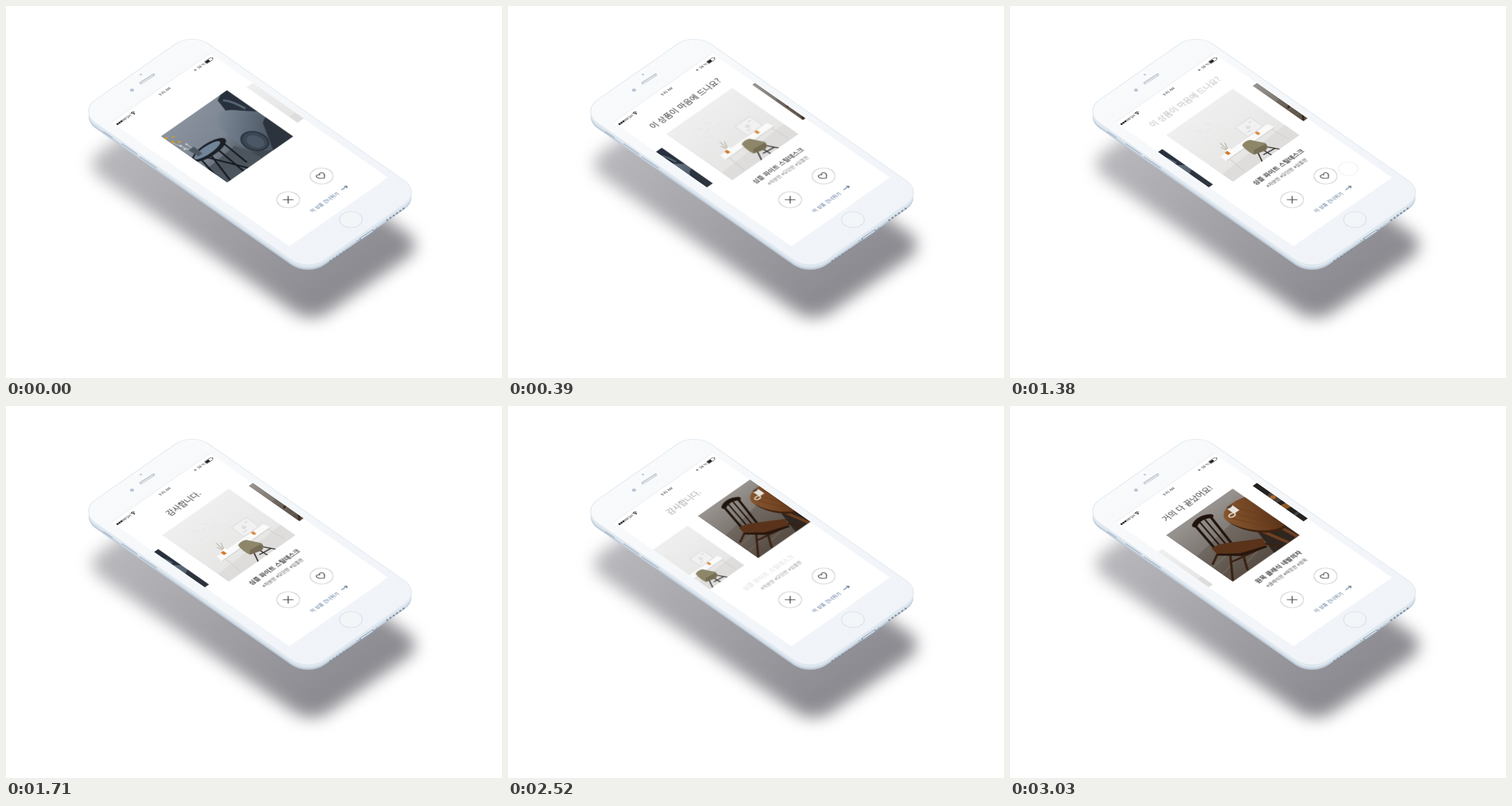
Write an HTML page that moves like this. It is 864x648 px and loops after 3.48 s.

```html
<!DOCTYPE html>
<html lang="ko">
<head>
<meta charset="utf-8">
<title>Furniture picks</title>
<style>
html, body { margin: 0; width: 100%; height: 100%; overflow: hidden; background: #fff; }
svg { display: block; width: 864px; height: 648px; }
text { font-family: "Noto Sans CJK KR", "Noto Sans CJK", "Noto Sans", sans-serif; }
.title { font-size: 9.8px; font-weight: 300; fill: #333; text-anchor: middle; }
.name { font-size: 7.5px; font-weight: 700; fill: #3a3a3a; text-anchor: middle; }
.tags { font-size: 5.65px; font-weight: 300; fill: #444; text-anchor: middle; }
.skip { font-size: 5.8px; fill: #45678a; }
.bar { font-size: 4.4px; fill: #222; }

.track, .card, .title, .name, .tags, .touch { animation: 3480ms linear infinite; }
.track { animation-name: slide; }
.card { animation-name: size; }
@keyframes slide {
  0% { transform: translate(-2.6px, 0); animation-timing-function: cubic-bezier(.393,.176,.697,.952); }
  12.07%, 64.66% { transform: translate(-106px, 0); animation-timing-function: cubic-bezier(.4,.1,.7,.95); }
  77.59%, 100% { transform: translate(-212px, 0); }
}
@keyframes size {
  0% { transform: scale(var(--a)); animation-timing-function: cubic-bezier(.393,.176,.697,.952); }
  12.07%, 64.66% { transform: scale(var(--b)); animation-timing-function: cubic-bezier(.4,.1,.7,.95); }
  77.59%, 100% { transform: scale(var(--c)); }
}

.title { --in: translate(0, -22px); --out: translate(0, -5px); }
.name, .tags { --in: translate(22px, 0); --out: translate(-14px, 0); }
@keyframes ask {
  0% { opacity: 0; transform: var(--in); animation-timing-function: ease-out; }
  9.48%, 34.48% { opacity: 1; transform: none; animation-timing-function: ease-in; }
  41.1%, 100% { opacity: 0; transform: var(--out); }
}
@keyframes thanks {
  0%, 40.5% { opacity: 0; transform: var(--in); animation-timing-function: ease-out; }
  49.14%, 67.24% { opacity: 1; transform: none; animation-timing-function: ease-in; }
  74.71%, 100% { opacity: 0; transform: var(--out); }
}
@keyframes almost {
  0%, 77.59% { opacity: 0; transform: var(--in); animation-timing-function: ease-out; }
  87.07%, 100% { opacity: 1; transform: none; }
}
@keyframes name1 {
  0%, 3.45% { opacity: 0; transform: var(--in); animation-timing-function: ease-in-out; }
  13.79%, 65.52% { opacity: 1; transform: none; animation-timing-function: ease-in; }
  72.99%, 100% { opacity: 0; transform: var(--out); }
}
@keyframes tags1 {
  0%, 4.31% { opacity: 0; transform: var(--in); animation-timing-function: ease-in-out; }
  14.66%, 68.1% { opacity: 1; transform: none; animation-timing-function: ease-in; }
  75.86%, 100% { opacity: 0; transform: var(--out); }
}
@keyframes name2 {
  0%, 75.86% { opacity: 0; transform: var(--in); animation-timing-function: ease-in-out; }
  86.21%, 100% { opacity: 1; transform: none; }
}
@keyframes tags2 {
  0%, 76.72% { opacity: 0; transform: var(--in); animation-timing-function: ease-in-out; }
  87.07%, 100% { opacity: 1; transform: none; }
}
.touch { animation-name: touch; }
@keyframes touch {
  0%, 18.1% { opacity: 0; transform: translate(35px, 12px); animation-timing-function: ease-in-out; }
  22% { opacity: .8; }
  30.17%, 34.48% { opacity: 1; transform: none; animation-timing-function: ease-in-out; }
  43.1%, 100% { opacity: 0; transform: translate(32px, 11px); }
}
</style>
</head>
<body>
<svg viewBox="0 0 864 648">
  <defs>
    <rect id="shell" x="-37" y="-88" width="170" height="344" rx="25" transform="matrix(1.16 -.81 1.16 .81 272 225)"/>
    <clipPath id="screen"><rect x="-24" y="-52" width="148" height="267"/></clipPath>
    <clipPath id="square"><rect width="100" height="100"/></clipPath>
    <filter id="soft" x="60" y="100" width="760" height="540" filterUnits="userSpaceOnUse" color-interpolation-filters="sRGB">
      <feGaussianBlur stdDeviation="14"/>
    </filter>
    <linearGradient id="shade" x1="0" y1="0" x2="0" y2="1"><stop stop-color="#b9b9bd"/><stop offset="1" stop-color="#88888e"/></linearGradient>
    <linearGradient id="face" x1="0" y1="0" x2="0" y2="1"><stop stop-color="#f8fafb"/><stop offset="1" stop-color="#f0f3f8"/></linearGradient>
    <linearGradient id="wall" x1="0" y1="0" x2=".3" y2="1"><stop stop-color="#8b939f"/><stop offset=".55" stop-color="#7c8592"/><stop offset="1" stop-color="#3f474f"/></linearGradient>
    <linearGradient id="arm" x1="0" y1="0" x2=".5" y2="1"><stop stop-color="#8592a0"/><stop offset="1" stop-color="#46515f"/></linearGradient>
    <linearGradient id="pale" x1="0" y1="0" x2="0" y2="1"><stop stop-color="#efefef"/><stop offset="1" stop-color="#e5e4e3"/></linearGradient>
    <linearGradient id="room" x1="0" y1="0" x2="0" y2="1"><stop stop-color="#989491"/><stop offset=".5" stop-color="#7b746e"/><stop offset="1" stop-color="#53483f"/></linearGradient>
    <linearGradient id="wood" x1="0" y1="0" x2="1" y2="1"><stop stop-color="#8d5a30"/><stop offset="1" stop-color="#5b3318"/></linearGradient>
  </defs>

  <g filter="url(#soft)"><use href="#shell" x="6" y="92" fill="url(#shade)"/></g>

  <!-- phone body -->
  <use href="#shell" y="9" fill="#bcc8d5"/>
  <use href="#shell" y="7" fill="#ccd7e2"/>
  <use href="#shell" y="5" fill="#d9e3ec"/>
  <use href="#shell" y="3" fill="#e4ecf3"/>
  <use href="#shell" y="1.5" fill="#d5e0ea"/>
  <use href="#shell" fill="url(#face)" stroke="#e2ebf1" stroke-width="1"/>
  <g fill="none" stroke="#aebccb" stroke-width="2" stroke-linecap="round">
    <path d="M170 219l15 10M202 240l26 18M234 263l28 19"/>
    <path d="M618 406l21-14" stroke="#93a1b1" stroke-width="5"/>
    <path d="M619 405l19-13" stroke="#dbe3ea" stroke-width="2"/>
    <path d="M565 444l30-19.500M664 373l29-20.500" stroke="#7f8c9b" stroke-width="3.400" stroke-dasharray="0 7"/>
    <path d="M612 409v0M646 386v0" stroke="#a3afbc" stroke-width="2.500"/>
    <path d="M235 134l22-14" stroke="#c4cbd5" stroke-width="5"/>
    <path d="M236 134l20-13" stroke="#e2e6eb"/>
  </g>
  <ellipse cx="219.500" cy="146.500" rx="3.500" ry="2.800" fill="#b9c5d8"/>
  <ellipse cx="235" cy="119.500" rx="2.300" ry="1.800" fill="#c7d0dc"/>

  <g transform="matrix(1.16 -.81 1.16 .81 272 225)">
    <rect x="-24" y="-52" width="148" height="267" fill="#fff"/>
    <path d="M-24 -52h148" stroke="#e2e8ee" stroke-width=".6"/>
    <circle cx="51" cy="232.500" r="12" fill="#f3f6f9" stroke="#dae2ea"/>

    <g clip-path="url(#screen)">
      <!-- status bar -->
      <g class="bar">
        <g fill="#222" stroke="#222" stroke-width=".5">
          <circle cx="-21.500" cy="-45.400" r="1.100"/><circle cx="-18.600" cy="-45.400" r="1.100"/><circle cx="-15.700" cy="-45.400" r="1.100"/>
          <circle cx="-12.800" cy="-45.400" r="1.100" fill="none"/><circle cx="-9.900" cy="-45.400" r="1.100" fill="none"/>
        </g>
        <text x="-7.800" y="-43.700">SH</text>
        <g fill="none" stroke="#222" stroke-width=".8"><path d="M-.6 -46.200a3.600 3.600 0 0 1 5.200 0M.5 -45a2.200 2.200 0 0 1 3 0"/><circle cx="2" cy="-43.900" r=".4"/></g>
        <text x="49" y="-43.600" text-anchor="middle">9:41 AM</text>
        <circle cx="95" cy="-45.300" r="1.400" fill="#999"/>
        <text x="99" y="-43.600">58 %</text>
        <rect x="110.500" y="-47.200" width="9.500" height="4" rx=".6" fill="#fff" stroke="#333" stroke-width=".5"/>
        <path d="M111 -46.700h5v3h-5zM120.600 -46h.8v1.600h-.8z" fill="#222"/>
      </g>

      <!-- product cards -->
      <g class="track">
        <g transform="translate(50 50)"><g class="card" style="--a:.994;--b:.76;--c:.76">
          <g transform="translate(-50 -50)" clip-path="url(#square)">
            <rect width="100" height="100" fill="url(#wall)"/>
            <path d="M82 4L90 0H100V46L90 40L76 24Z" fill="#27303c"/>
            <path d="M86 8Q92 14 94 34" fill="none" stroke="#596675" stroke-width="3"/>
            <path d="M54 40Q56 22 66 19Q78 17 88 32L100 46V100H72L58 90Q48 76 51 62Z" fill="url(#arm)"/>
            <path d="M92 62L100 58V100H70Z" fill="#2c333d"/>
            <ellipse cx="66" cy="76" rx="13" ry="16" fill="#3c4653" stroke="#252d38" stroke-width="1.500"/>
            <ellipse cx="66" cy="77" rx="8" ry="11" fill="#4b5765"/>
            <path d="M0 70L46 66L54 100H0Z" fill="#4c545d"/>
            <path d="M6 54L-3 92M18 57L5 100M29 57L25 100M40 55L37 93M12 57L32 100" fill="none" stroke="#14171b" stroke-width="2"/>
            <ellipse cx="22" cy="51" rx="24" ry="9" fill="#1c2026"/>
            <ellipse cx="20" cy="50" rx="19" ry="5.500" fill="#71859a"/>
            <path d="M4 24L10 47M2 16L9 46M11 26L11 46" stroke="#c9ccc8" stroke-width=".8"/>
            <path d="M6 36h8l-1 14h-6z" fill="#4b5660"/>
            <g fill="#d99a22"><circle cx="2" cy="6" r="1.700"/><circle cx="3" cy="15" r="1.800"/><circle cx="8" cy="20" r="1.700"/><circle cx="9" cy="10" r="1.400"/></g>
            <g fill="#d8dad8"><circle cx="5" cy="25" r="1.300"/><circle cx="11" cy="28" r="1.200"/><circle cx="4" cy="32" r="1.200"/></g>
          </g></g></g>

        <g transform="translate(156 50)"><g class="card" style="--a:.766;--b:1;--c:.76">
          <g transform="translate(-50 -50)" clip-path="url(#square)">
            <rect width="100" height="100" fill="url(#pale)"/>
            <path d="M0 84L100 78V100H0Z" fill="#dedddc"/>
            <path d="M26 18l7 3M32 28l8-2M42 17l3 6M24 33l8 2M47 29l6 1" stroke="#e7e7e6" stroke-width="1.500"/>
            <rect x="60" y="44" width="22" height="19" fill="#f1f1f1" stroke="#d7d7d7" stroke-width=".7"/>
            <circle cx="70" cy="53" r="2.500" fill="#dedede"/><path d="M64 58h5M75 49h4" stroke="#d2d2d2" stroke-width="1"/>
            <path d="M18 64H88L90 73H17Z" fill="#fafafa"/>
            <path d="M18 73H90M22 74L20 98M86 74L88 97" stroke="#d1d0cf" stroke-width="1"/>
            <path d="M30 64L32 49M30 64L36 52M30 64L28 54" fill="none" stroke="#aaa79c" stroke-width=".8"/>
            <path d="M25 63h4v5h-4z" fill="#d4792b"/><path d="M69 64h3.500v5h-3.500z" fill="#d98a3d"/><path d="M29 61h4v7h-4z" fill="#fff"/>
            <path d="M50 88L43 102M57 90L58 104M63 88L70 100M52 94L68 96" fill="none" stroke="#33312d" stroke-width="1.400"/>
            <path d="M46 68Q52 65 58 68L66 83Q65 90 58 91L45 87Q43 78 46 68Z" fill="#8e8669"/>
            <path d="M45 87L50 82L65 84Q65 90 58 91Z" fill="#766e54"/>
          </g></g></g>

        <g transform="translate(262 50)"><g class="card" style="--a:.76;--b:.76;--c:1">
          <g transform="translate(-50 -50)" clip-path="url(#square)">
            <rect width="100" height="100" fill="url(#room)"/>
            <path d="M0 46L100 30V100H0Z" fill="#5e544c" opacity=".45"/>
            <path d="M100 62V100H62L72 66Z" fill="#2f2620"/>
            <path d="M0 70L30 66M0 84L24 80M30 90L60 84" stroke="#8b8076" stroke-width=".8" opacity=".6"/>
            <path d="M76 66L84 100M94 72L97 100" stroke="#6f4020" stroke-width="4"/>
            <path d="M61 30C61 18 80 11 100 18V78C84 80 62 56 61 30Z" fill="url(#wood)"/>
            <path d="M61 30C62 56 84 80 100 78V81C82 84 59 58 61 30Z" fill="#40220f"/>
            <path d="M72 22l18 40M80 18l17 40M66 28l18 37" stroke="#6b3e1d" stroke-width="1"/>
            <path d="M74 17h8v11h-8z" fill="#e6e2dc"/><ellipse cx="78" cy="17" rx="4" ry="1.800" fill="#5d4330"/>
            <ellipse cx="71" cy="28" rx="4" ry="2.500" fill="none" stroke="#e5ddd2" stroke-width="1.500"/>
            <g fill="none" stroke="#21140d" stroke-linecap="round">
              <path d="M32 11Q44 5 54 13" stroke-width="6"/>
              <path d="M32 12L23 48M53 14L40 59" stroke-width="3"/>
              <path d="M39 12L29 52M46 12L35 55" stroke-width="1.800"/>
              <path d="M22 57L4 66M30 66L2 98M40 74L24 98M64 82L74 98M20 78L60 86" stroke-width="2.600" stroke="#3a2112"/>
            </g>
            <path d="M20 48Q30 48 40 56L69 76L64 86L36 75L18 58Z" fill="#5a331a"/>
            <path d="M18 58L36 75L64 86L63 89L34 79L17 61Z" fill="#28160c"/>
          </g></g></g>

        <g transform="translate(368 50)"><g class="card" style="--a:.76;--b:.76;--c:.76">
          <g transform="translate(-50 -50)" clip-path="url(#square)">
            <rect width="100" height="100" fill="#25211f"/>
            <path d="M0 28L40 20V54L0 48Z" fill="#4a4037"/>
            <path d="M0 55L30 60V70L0 66Z" fill="#8a5728"/>
            <circle cx="4" cy="36" r="4" fill="#a86a2f"/>
            <path d="M0 80h40v5H0z" fill="#3c4247"/>
          </g></g></g>
      </g>

      <text class="title" style="animation-name:ask" x="50" y="-14.600">이 상품이 마음에 드나요?</text>
      <text class="title" style="animation-name:thanks" x="50" y="-14.600">감사합니다.</text>
      <text class="title" style="animation-name:almost" x="50" y="-14.600">거의 다 끝났어요!</text>
      <text class="name" style="animation-name:name1" x="50" y="121.400">심플 화이트 스틸데스크</text>
      <text class="tags" style="animation-name:tags1" x="50" y="133">#차분한 #모던한 #심플한</text>
      <text class="name" style="animation-name:name2" x="50" y="121.400">원목 클래식 네발의자</text>
      <text class="tags" style="animation-name:tags2" x="50" y="133">#클래식한 #따뜻한 #원목</text>

      <!-- buttons -->
      <g fill="none" stroke="#555" stroke-width="1.100" stroke-linecap="round" stroke-linejoin="round">
        <g stroke="#b4b4b4" stroke-width=".7"><circle cx="25.200" cy="164" r="12.200"/><circle cx="75.800" cy="163.600" r="12.200"/></g>
        <path d="M21.500 160.300l7.400 7.400M28.900 160.300l-7.400 7.400"/>
        <path d="M75.500 167.800C71 164.600 70.300 162.400 71 160.700C72 158.600 74.700 158.900 75.500 161C76.300 158.900 79 158.600 80 160.700C80.700 162.400 80 164.600 75.500 167.800Z"/>
        <path d="M76 193.500h8M81.800 191.600l2.200 1.900l-2.200 1.900" stroke="#45678a" stroke-width=".9"/>
      </g>
      <text class="skip" x="29.500" y="195.900">이 상품 건너뛰기</text>
      <circle class="touch" cx="79" cy="165.400" r="10.300" fill="#fff" fill-opacity=".35" stroke="#999" stroke-opacity=".6" stroke-width=".8"/>
    </g>
  </g>
</svg>
</body>
</html>
```
